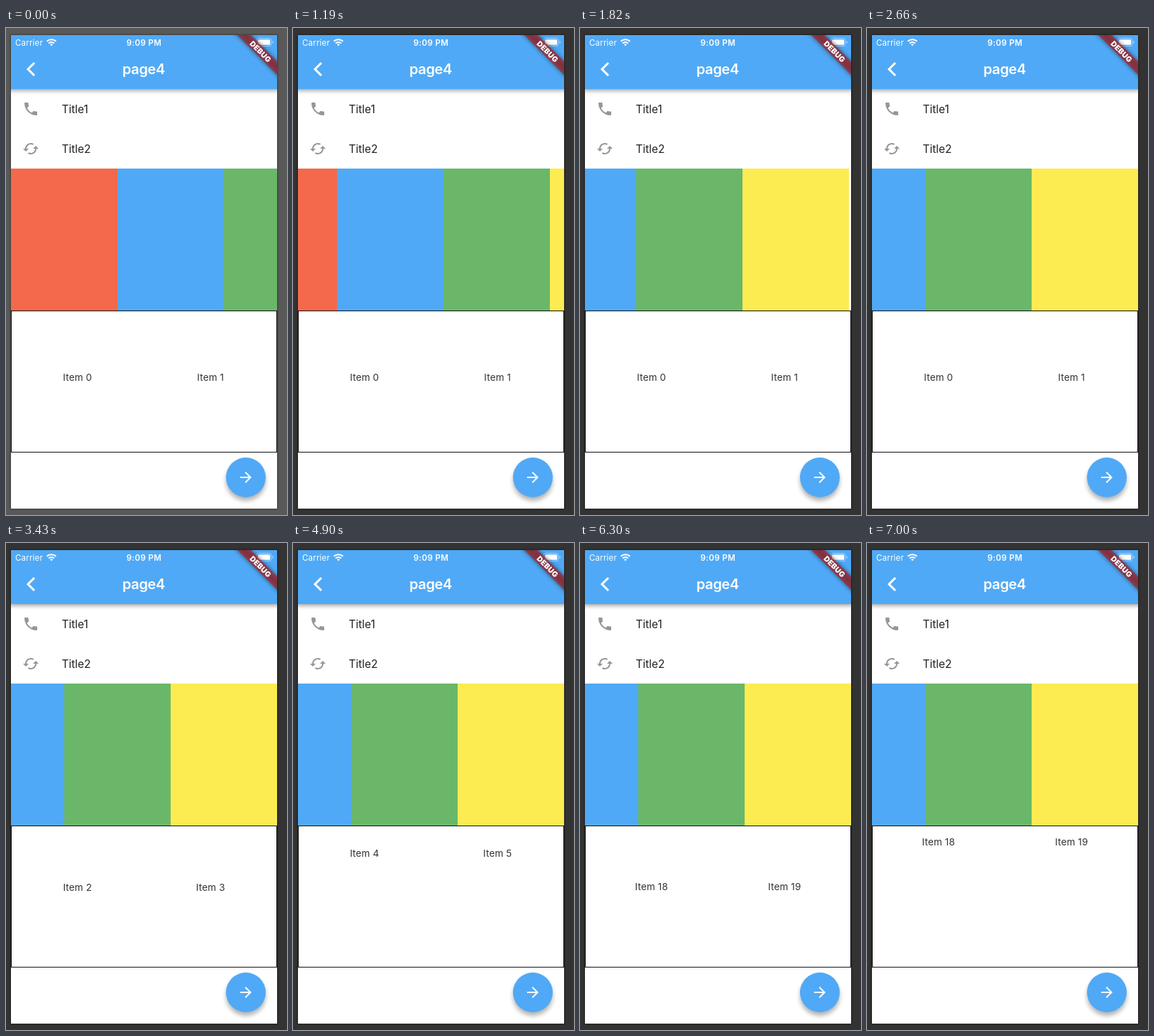
Recreate the animation shown at these times as an HTML page. Size 396 by 686 pixels, loop 7.07 s.

```html
<!DOCTYPE html>
<html lang="en">
<head>
<meta charset="utf-8">
<title>page4</title>
<style>
  html, body { margin: 0; width: 100%; height: 100%; overflow: hidden; background: #333; }
  svg { display: block; width: 396px; height: 686px; }
  text { font-family: Inter, Roboto, sans-serif; }
  .status { font-size: 11.5px; fill: #fff; letter-spacing: .2px; }
  .time { font-weight: 600; letter-spacing: .4px; text-anchor: middle; }
  .heading { font-size: 20px; font-weight: 600; fill: #fff; letter-spacing: -.4px; text-anchor: middle; }
  .tile { font-size: 15.5px; fill: #222; }
  .item { font-size: 13.5px; fill: #333; letter-spacing: .15px; text-anchor: middle; }
  .debug { font-size: 10.5px; font-weight: 900; fill: #fff; letter-spacing: .2px; text-anchor: middle; }
  .icon { fill: #969696; }
  .soft { filter: blur(3px); }
</style>
</head>
<body>
<svg viewBox="0 0 396 686">
  <defs>
    <clipPath id="screen"><rect x="7" y="10" width="375" height="667"/></clipPath>
    <clipPath id="strip"><rect x="7" y="198" width="375" height="200"/></clipPath>
    <clipPath id="box"><rect x="8" y="399" width="373" height="198"/></clipPath>
  </defs>
  <rect id="desk" width="396" height="686" fill="#595959"/>
  <rect x="6" y="9" width="377" height="669" fill="#000" opacity=".3" style="filter:blur(1px)"/>

  <g clip-path="url(#screen)">
    <rect x="7" y="10" width="375" height="667" fill="#fff"/>
    <rect class="soft" x="4" y="14" width="381" height="74" opacity=".4"/>
    <rect x="7" y="10" width="375" height="76" fill="#50a9f6"/>

    <text class="status" x="13" y="24.5">Carrier</text>
    <g fill="none" stroke="#fff" stroke-width="2">
      <path d="M57.5 18.8a9.3 9.3 0 0 1 13 0M60 21.6a5.7 5.7 0 0 1 8 0"/>
      <path d="M62 23l2 2.6 2-2.6q-2-1.5-4 0z" fill="#fff" stroke="none"/>
    </g>
    <text class="status time" x="194.5" y="24.5">9:09 PM</text>
    <rect x="353" y="14.5" width="21" height="11" rx="3" fill="none" stroke="#fff" stroke-opacity=".45"/>
    <rect x="355" y="16.3" width="17.3" height="7.5" rx="1.5" fill="#fff"/>
    <path d="M375.5 18v4q1.5-.5 1.5-2t-1.5-2z" fill="#fff" opacity=".5"/>

    <path d="M40 49l-9 9 9 9" fill="none" stroke="#fff" stroke-width="3"/>
    <text class="heading" x="194" y="65">page4</text>

    <path class="icon" transform="translate(23 102)" d="M6.62 10.79c1.44 2.83 3.76 5.14 6.59 6.59l2.2-2.2c.27-.27.67-.36 1.02-.24 1.12.37 2.33.57 3.57.57.55 0 1 .45 1 1V20c0 .55-.45 1-1 1-9.39 0-17-7.61-17-17 0-.55.45-1 1-1h3.5c.55 0 1 .45 1 1 0 1.25.2 2.45.57 3.57.11.35.03.74-.25 1.02z"/>
    <text class="tile" x="78.5" y="119.5">Title1</text>
    <path class="icon" transform="translate(23 158)" d="M19 8l-4 4h3c0 3.31-2.69 6-6 6-1.01 0-1.97-.25-2.8-.7l-1.46 1.46C8.97 19.54 10.43 20 12 20c4.42 0 8-3.58 8-8h3zM6 12c0-3.31 2.69-6 6-6 1.01 0 1.97.25 2.8.7l1.46-1.46C15.03 4.46 13.57 4 12 4c-4.42 0-8 3.58-8 8H1l4 4 4-4z"/>
    <text class="tile" x="78.5" y="175.5">Title2</text>

    <g clip-path="url(#strip)"><g id="cards"></g></g>
    <rect x="7.5" y="398.5" width="374" height="199" fill="#fff" stroke="#111"/>
    <g clip-path="url(#box)"><g id="grid"></g></g>

    <circle class="soft" cx="338" cy="638" r="28" opacity=".3"/>
    <circle cx="338" cy="633" r="28" fill="#50a9f6"/>
    <path transform="translate(326 621)" fill="#fff" d="M12 4l-1.41 1.41L16.17 11H4v2h12.17l-5.58 5.59L12 20l8-8z"/>

    <g transform="translate(358.75 33.25) rotate(45)">
      <rect class="soft" x="-50" y="-6.7" width="100" height="13.4" opacity=".5"/>
      <rect x="-50" y="-6.7" width="100" height="13.4" fill="#b71c1c" opacity=".627"/>
      <text class="debug" y="3.8">DEBUG</text>
    </g>
  </g>
</svg>
<script>
const LOOP = 7070, STEP = 70, CELL = 187.5;
const byId = id => document.getElementById(id);
const desk = byId('desk'), cards = byId('cards'), grid = byId('grid');

function add(parent, name, attrs, label = '') {
  const node = document.createElementNS(parent.namespaceURI, name);
  for (const key in attrs) node.setAttribute(key, attrs[key]);
  node.textContent = label;
  parent.append(node);
}

['#f4694c', '#50a9f6', '#6ab76a', '#fdeb52'].forEach((fill, i) =>
  add(cards, 'rect', { x: 7 + i * 150, y: 198, width: 150, height: 200, fill }));

for (let i = 0; i < 22; i++) {
  const x = 7 + CELL * (i % 2 + .5);
  const y = 497 + CELL * Math.floor(i / 2);
  add(grid, 'text', { class: 'item', x, y }, `Item ${i}`);
}

// Linear interpolation through [seconds, value] points.
function track(points, t) {
  const next = points.findIndex(p => p[0] > t);
  if (next === 0) return points[0][1];
  if (next < 0) return points[points.length - 1][1];
  const [t0, a] = points[next - 1], [t1, b] = points[next];
  return a + (b - a) * (t - t0) / (t1 - t0);
}

// Scroll released at `start` seconds, slowing down by friction towards `end`.
const fling = (t, start, from, end) => end - (end - from) * Math.exp(-1.98 * (t - start));

const scrollX = t => track([[.91, 0], [1.19, 95], [1.4, 190], [1.54, 225],
  [1.68, 233], [1.82, 228], [2.03, 225]], t);

function scrollY(t) {
  if (t < 3.1) return track([[2.7, 0], [2.87, 55], [3.1, 158]], t);
  const first = fling(t, 3.1, 158, 235);
  if (t < 4.7) return first;
  if (t < 4.9) return 232 + 198 * ((t - 4.7) / .2) ** 1.5;
  return fling(t, 4.9, 430, 1780);
}

function draw(now) {
  const t = Math.floor(now % LOOP / STEP) * STEP / 1000;
  desk.setAttribute('fill', t < .84 ? '#595959' : '#333');
  cards.setAttribute('transform', `translate(${-scrollX(t)} 0)`);
  grid.setAttribute('transform', `translate(0 ${-scrollY(t)})`);
}

function tick() {
  draw(performance.now());
  requestAnimationFrame(tick);
}
tick();
</script>
</body>
</html>
```
